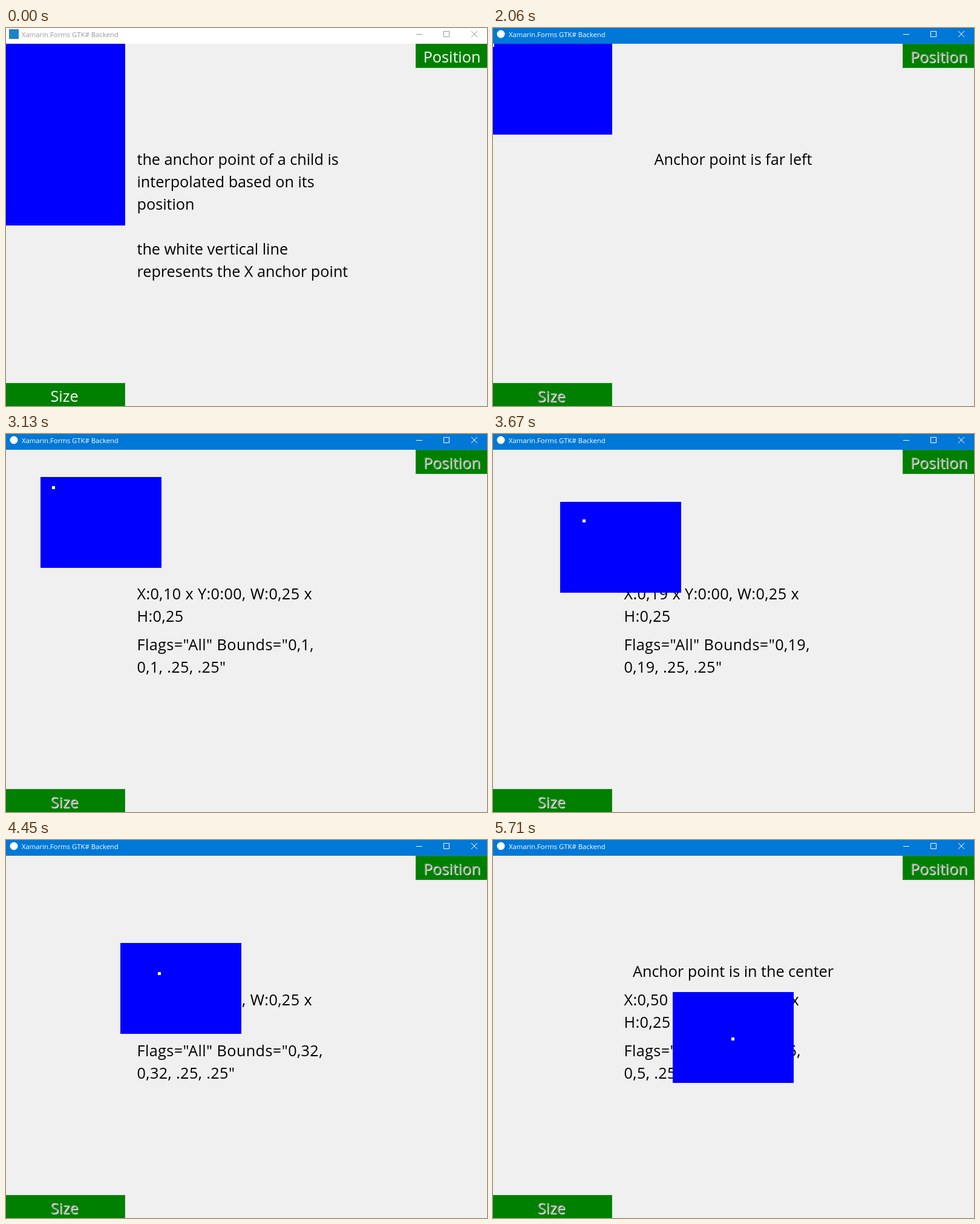
An HTML page for the animation above (8 s loop, 795 by 624 pixels).

```html
<!DOCTYPE html>
<html lang="en">
<head>
<meta charset="utf-8">
<title>Anchor point demo</title>
<style>
  html, body { margin: 0; width: 100%; height: 100%; overflow: hidden; background: #f0f0f0; }
  svg { display: block; }
  text { font: 25.2px "Open Sans", "Noto Sans", sans-serif; white-space: pre; }
  #title { font-size: 11.3px; }
  #lines.values { letter-spacing: 0.4px; }
  .mid { text-anchor: middle; }
  .button rect { fill: #008000; stroke: #228b22; }
  .button text { fill: #fff; text-anchor: middle; }
  .button .face { display: none; fill: #a0a0a0; }
  .disabled .face { display: inline; }
  .disabled .label { transform: translate(1px, 1px); }
</style>
</head>
<body>
<svg width="795" height="624" viewBox="0 0 795 624">
  <rect id="bar" width="795" height="26"/>
  <rect id="icon" x="5" y="2" width="16" height="16" fill="#1b83c9"/>
  <circle id="iconOn" cx="13" cy="10" r="6.5" fill="#fff"/>
  <text id="title" x="26" y="15">Xamarin.Forms GTK# Backend</text>
  <path id="controls" fill="none" d="M678 10.5h10M723.5 5.5h9v9h-9zM769 5l10 10M779 5l-10 10"/>

  <g id="lines"></g>
  <text id="status" class="mid" x="397" y="226"></text>
  <rect id="box" width="200" fill="#00f"/>
  <rect id="dot" width="5" height="5" fill="#fff"/>

  <g id="position" class="button">
    <rect x="677.5" y="26.5" width="119" height="39"/>
    <text class="label" x="737" y="57">Position</text>
    <text class="face" x="737" y="57">Position</text>
  </g>
  <g id="size" class="button">
    <rect x="-2.5" y="586.5" width="199" height="39"/>
    <text class="label" x="96.5" y="617">Size</text>
    <text class="face" x="96.5" y="617">Size</text>
  </g>
  <path id="cursor" d="M.5.5v16l3.7-3.6 2.4 5.6 2.3-1-2.4-5.4h5z" fill="#fff" stroke="#000"/>
</svg>
<script>
const LOOP = 8000;
const $ = id => document.getElementById(id);
const set = (id, attrs) => {
  for (const name in attrs) $(id).setAttribute(name, attrs[name]);
};
const show = (id, on) => set(id, { visibility: on ? 'visible' : 'hidden' });

const intro = [
  [226, 'the anchor point of a child is'],
  [263, 'interpolated based on its'],
  [300, 'position'],
  [374, 'the white vertical line'],
  [411, 'represents the X anchor point']
];

// n is the position in hundredths
function values(n) {
  const fixed = '0,' + String(n).padStart(2, '0');
  const short = String(n / 100).replace('.', ',');
  return [
    [273, `X:${fixed} x Y:0:00, W:0,25 x`],
    [310, 'H:0,25'],
    [357, `Flags="All" Bounds="${short},`],
    [394, `${short}, .25, .25"`]
  ];
}

let shown = '';
function setLines(list) {
  const html = list.map(([y, s]) => `<text x="216.5" y="${y}">${s}</text>`).join('');
  if (html !== shown) $('lines').innerHTML = shown = html;
}

function drawCursor(t) {
  const k = Math.min(10, Math.floor((t - 100) / 79)) / 10;
  const rest = (1 - k) ** 2;
  const [x, y] = t < 1500 ? [720 + 62 * rest, 57 + 539 * rest] : [756, 66];
  set('cursor', { transform: `translate(${Math.round(x)} ${Math.round(y)})` });
  show('cursor', t >= 100 && t < 1600);
}

function draw(t) {
  const active = t >= 950, started = t >= 1060, moving = t >= 2580;
  const step = Math.floor((t - 2580) / 78.25 + 0.1);
  const n = moving ? Math.min(50, Math.round(1 + step * 9 / 7)) : 0;
  const top = Math.round(26 + 4.5 * n);

  set('bar', { fill: active ? '#0078d7' : '#fff' });
  set('title', { fill: active ? '#fff' : '#999' });
  set('controls', { stroke: active ? '#fff' : '#999' });
  show('icon', !active);
  show('iconOn', active);

  $('lines').classList.toggle('values', moving);
  setLines(moving ? values(n) : t < 2060 ? intro : []);
  $('status').textContent =
    t >= 5705 ? 'Anchor point is in the center' :
    t >= 2060 && !moving ? 'Anchor point is far left' : '';

  set('box', { x: 6 * n - 3, y: top, height: started ? 150 : 300 });
  set('dot', { x: Math.round(7.95 * n - 3.5), y: top + Math.round(1.5 * n) });
  show('dot', started);

  for (const id of ['position', 'size']) $(id).classList.toggle('disabled', started);
  $('position').firstElementChild.style.fill = t >= 811 && !started ? '#008017' : '';
  drawCursor(t);
}

const start = performance.now();
function frame(now) {
  draw(Math.max(0, now - start) % LOOP);
  requestAnimationFrame(frame);
}
draw(0);
requestAnimationFrame(frame);
</script>
</body>
</html>
```
